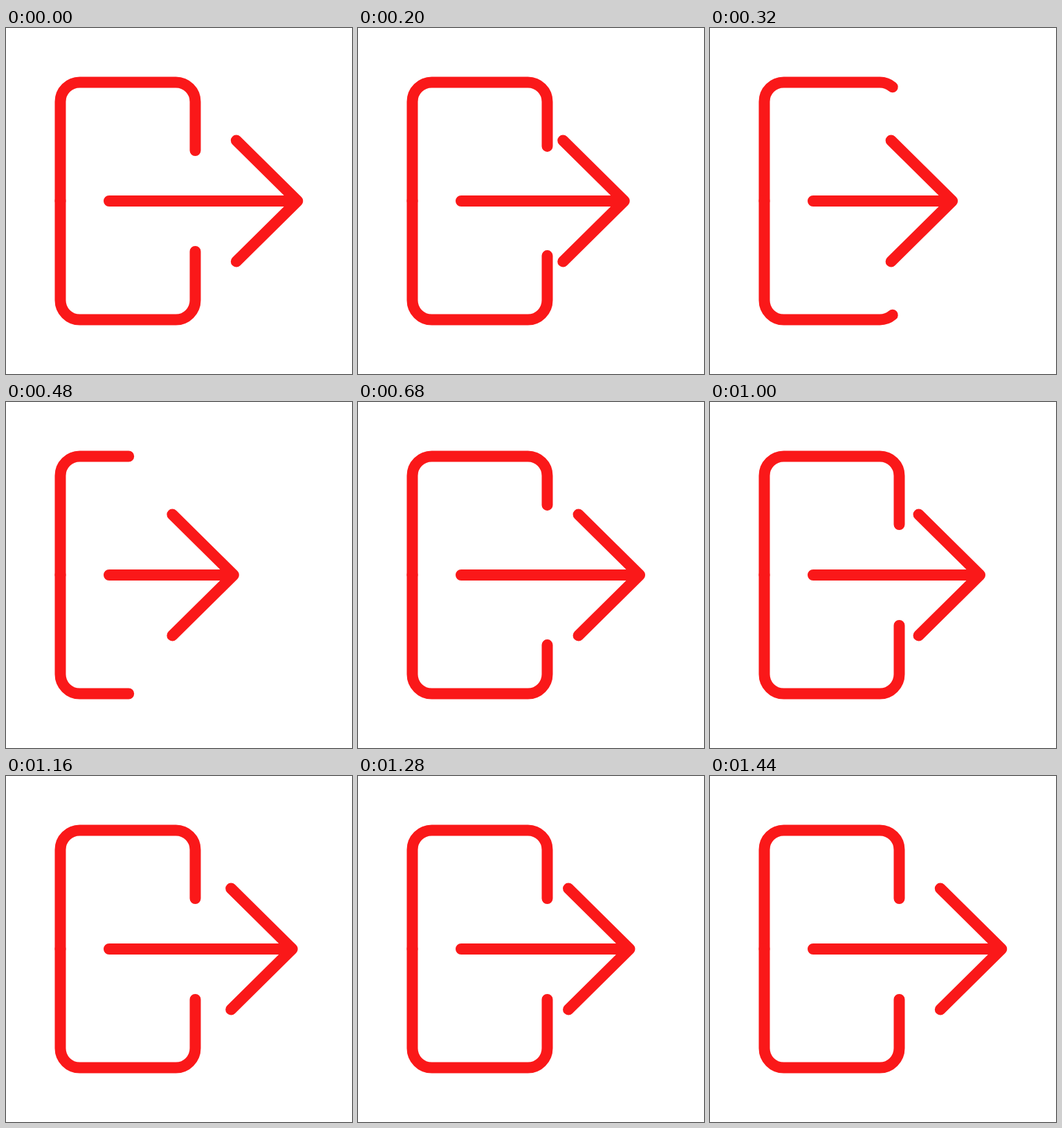
Recreate the animation shown at these times as an HTML page. Size 500 by 500 pixels, loop 2 s.

```html
<!DOCTYPE html>
<html lang="en">
<head>
<meta charset="utf-8">
<title>Exit icon</title>
<style>
  html, body { margin: 0; width: 100%; height: 100%; overflow: hidden; background: #fff; }
  svg { display: block; width: 100%; height: 100%; }
</style>
</head>
<body>
<svg viewBox="0 0 500 500" fill="none" stroke="#fa1819" stroke-width="16"
     stroke-linecap="round" stroke-linejoin="round">
  <defs>
    <path id="half" d="M78.5 250V106.5a28 28 0 0 1 28-28H245.5a28 28 0 0 1 28 28V177"/>
  </defs>
  <use href="#half"/>
  <use href="#half" transform="matrix(1 0 0 -1 0 500)"/>
  <path id="arrow"/>
</svg>
<script>
const LOOP = 2000, STEP = 40;

// Keyframes as [ms, value], eased in and out between neighbours.
const pull = [[0, 0], [467, 93], [750, 0], [900, 56], [1117, 0], [1250, 31], [1433, 0]];
const trim = [[167, 0], [467, 184], [750, 0]];

const half = document.getElementById('half');
const arrow = document.getElementById('arrow');
const length = half.getTotalLength();

function valueAt(keys, t) {
  const next = keys.findIndex(([time]) => time > t);
  if (next < 1) return keys[0][1];
  const [t0, a] = keys[next - 1], [t1, b] = keys[next];
  const s = (t - t0) / (t1 - t0);
  return a + (b - a) * s * s * (3 - 2 * s);
}

function draw(now) {
  const t = Math.floor((now % LOOP) / STEP) * STEP;
  const tip = 421.3 - valueAt(pull, t);
  const barb = tip - 88.5;
  arrow.setAttribute('d', `M149 250H${tip}M${barb} 162.5L${tip} 250L${barb} 337.5`);
  half.setAttribute('stroke-dasharray', `${length - valueAt(trim, t)} ${2 * length}`);
}

let start;
function tick(now) {
  start ??= now;
  draw(now - start);
  requestAnimationFrame(tick);
}
draw(0);
requestAnimationFrame(tick);
</script>
</body>
</html>
```
